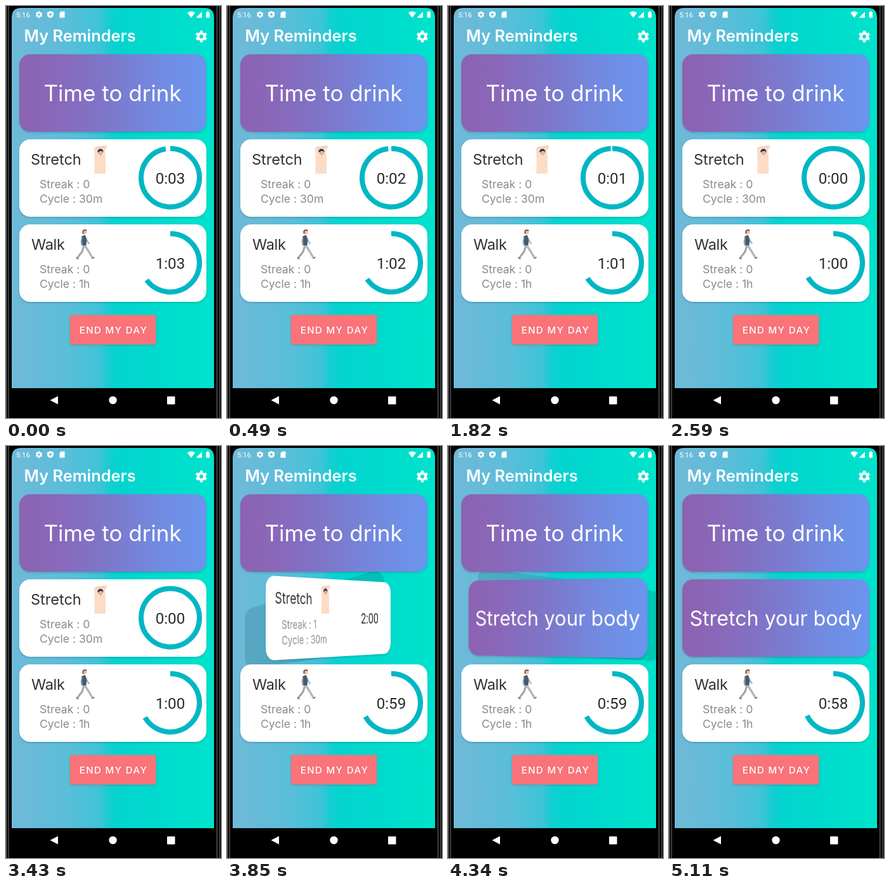
An HTML page for the animation above (5.18 s loop, 339 by 649 pixels).

```html
<!DOCTYPE html>
<html lang="en">
<head>
<meta charset="utf-8">
<title>Reminders</title>
<style>
  html, body { margin: 0; width: 100%; height: 100%; overflow: hidden; background: #000; }
  #stage { position: relative; width: 339px; height: 649px; overflow: hidden; background: #000; }
  svg { position: absolute; left: 0; top: 0; overflow: visible; }
  text { font-family: Inter, "Open Sans", sans-serif; }
  .card { position: absolute; left: 21px; width: 295px; height: 121.5px; border-radius: 17px; background: #fff; box-shadow: 0 1.5px 3px rgba(0,40,60,.22); }
  .alert { background: linear-gradient(90deg, #8d62b3, #8968b9 20%, #7d77ca 47%, #728ae0 74%, #6b95ee); }
  .alert text { fill: #fff; text-anchor: middle; }
  .name { font-size: 23.5px; fill: #303036; }
  .info { font-size: 17.6px; fill: #8a8a8a; }
  .time { font-family: Roboto, Arial, sans-serif; font-size: 24.2px; fill: #2c2c30; text-anchor: middle; }
  .ring { fill: none; stroke: #00b7c3; stroke-width: 8; }
  #button { position: absolute; left: 101px; top: 487px; width: 135px; height: 46px; border-radius: 3px; background: #f97379; box-shadow: 0 0 0 1px rgba(150,160,160,.6), 0 1px 3px rgba(0,40,60,.3); }
</style>
</head>
<body>
<div id="stage">
  <svg width="339" height="649">
    <defs>
      <linearGradient id="sky">
        <stop offset="0" stop-color="#70b9d8"/>
        <stop offset=".28" stop-color="#5abed9"/>
        <stop offset=".44" stop-color="#3cc4d7"/>
        <stop offset=".48" stop-color="#16cdd2"/>
        <stop offset=".53" stop-color="#04d4cf"/>
        <stop offset=".72" stop-color="#00dacd"/>
        <stop offset="1" stop-color="#00e3cb"/>
      </linearGradient>
      <g id="gear" fill="none" stroke="#fff">
        <circle r="5.1" stroke-width="4"/>
        <circle r="7.6" stroke-width="3.2" pathLength="12" stroke-dasharray="1 1" stroke-dashoffset="-.5"/>
      </g>
    </defs>
    <path d="M.7 0V649M4 0V649M332.7 0V649M337 0V649" stroke="#66666a" stroke-width="1.2"/>
    <path d="M9 602V18Q9 3 24 3H313Q328 3 328 18V602Z" fill="url(#sky)"/>

    <g fill="#fff">
      <text x="16" y="17.5" style="font: 11.3px Roboto, Arial, sans-serif">5:16</text>
      <use href="#gear" transform="translate(52 13.5) scale(.58)"/>
      <path d="M70 8L75 10V13.5Q75 17 70 19Q65 17 65 13.5V10Z"/>
      <circle cx="70" cy="13.3" r="1.8" fill="#4bbfd6"/>
      <path d="M87 8.5H92.5V18.5H84.5V11Z"/>
      <path d="M286 10.5Q292 6.5 298 10.5L292 18.5Z"/>
      <path d="M309 9V18.5H299.5Z"/>
      <path d="M315.5 9.5H317V8.3H319.5V9.5H321V18.5H315.5Z"/>
      <text x="28.5" y="56" font-size="25.4" font-weight="600">My Reminders</text>
      <use href="#gear" transform="translate(308 48)"/>
      <path d="M82 614.5V627.5L69.5 621Z"/>
      <circle cx="168.5" cy="621" r="6.2"/>
      <rect x="254" y="615" width="12.5" height="12.5" rx="1"/>
    </g>
    <polygon id="shade" fill="#064a55" stroke="#064a55" stroke-width="30" stroke-linejoin="round"/>
  </svg>

  <div class="card alert" style="top:76px">
    <svg width="295" height="121"><text x="147" y="74" font-size="35">Time to drink</text></svg>
  </div>

  <div class="card" id="front" style="top:210px">
    <svg width="295" height="121">
      <text class="name" x="18" y="40">Stretch</text>
      <text class="info" x="32" y="77" id="streak"></text>
      <text class="info" x="32" y="100">Cycle : 30m</text>
      <g>
        <path d="M118.5 54V27L117.5 14L121 11.5L137 9L139 11.5L135 18L136 28V54Z" fill="#fddcc6"/>
        <path d="M120 14L135 12" stroke="#edc0a7" fill="none"/>
        <circle cx="128" cy="21" r="4" fill="#f6cbb4"/>
        <path d="M123 20.5Q123.5 15 128 15Q132.500 15 132.500 20.500Q130 17.500 127 19Z" fill="#34344c"/>
        <path d="M125.500 21.500H127M129.500 21.500H131" stroke="#34344c"/>
        <path d="M127 24H129.500" stroke="#cf6b6b"/>
      </g>
      <circle class="ring" id="stretchRing" cx="238" cy="60.5" r="46" pathLength="360" transform="rotate(-90 238 60.5)"/>
      <text class="time" id="stretchTime" x="238" y="70"></text>
    </svg>
  </div>
  <div class="card alert" id="back" style="top:210px">
    <svg width="295" height="121"><text x="147.500" y="73" font-size="32.2">Stretch your body</text></svg>
  </div>

  <div class="card" style="top:344px">
    <svg width="295" height="121">
      <text class="name" x="19" y="40" letter-spacing="-.3">Walk</text>
      <text class="info" x="32" y="77">Streak : 0</text>
      <text class="info" x="32" y="100">Cycle : 1h</text>
      <g fill="none" stroke-linecap="round" stroke-linejoin="round">
        <path d="M102 33L99 43L92 52" stroke="#a3a3a9" stroke-width="3"/>
        <path d="M103 33L109 42L115 52" stroke="#b4b4b9" stroke-width="3.4"/>
        <path d="M90 53L93 54M115 53.500L118 52" stroke="#6a6a72" stroke-width="1.6"/>
        <path d="M98 19L103.500 16.500L106.500 23L105.500 33H99.500Z" fill="#465a70"/>
        <path d="M99 21L97.500 28L99 33" stroke="#8494a5" stroke-width="1.8"/>
        <path d="M105.500 22L107.500 27L110 30" stroke="#8494a5" stroke-width="1.600"/>
        <circle cx="103.500" cy="12.500" r="3" fill="#f3c3a6"/>
        <path d="M100.500 14V10.500Q102 8 105.500 9.500" stroke="#75503f" stroke-width="2"/>
      </g>
      <circle class="ring" id="walkRing" cx="238" cy="60.5" r="46" pathLength="360" transform="rotate(-90 238 60.5)"/>
      <text class="time" id="walkTime" x="238" y="70"></text>
    </svg>
  </div>

  <div id="button">
    <svg width="135" height="46"><text x="68.500" y="28.500" font-size="15" font-weight="500" fill="#fff" text-anchor="middle" letter-spacing="1.4">END MY DAY</text></svg>
  </div>
</div>

<script>
const LOOP = 5180, STEP = 70, FIRST_TICK = 470, FLIP_START = 3473, FLIP_TIME = 1084, DEPTH = 1200;
const CENTER = { x: 168.5, y: 270.5 }, HALF = { w: 147.5, h: 60.75 }, ROUND = 15;
const el = id => document.getElementById(id);
const clock = s => Math.floor(s / 60) + ':' + String(s % 60).padStart(2, '0');

function setTimer(name, left, total) {
  const sweep = 360 * (1 - left / total);
  const ring = el(name + 'Ring');
  el(name + 'Time').textContent = clock(left);
  ring.style.visibility = sweep > 0 ? 'visible' : 'hidden';
  ring.setAttribute('stroke-dasharray', sweep >= 360 ? 'none' : sweep + ' 360');
}

// The edge nearer to the viewer throws its shadow further out and down.
function drawShade(angle) {
  const sin = Math.sin(angle), cos = Math.cos(angle), ramp = Math.min(1, 4 * sin);
  const edge = (side, dx, dy) => {
    const scale = DEPTH / (DEPTH + side * HALF.w * sin);
    const x = CENTER.x + side * HALF.w * cos * scale + dx - ROUND * Math.sign(cos) * side;
    const reach = HALF.h * scale - ROUND;
    return [[x, CENTER.y - reach + dy].join(), [x, CENTER.y + reach + dy / 4].join()];
  };
  const near = edge(-1, -66 * sin * cos, 68 * sin);
  const far = edge(1, -15 * cos * ramp, -18 * ramp);
  el('shade').setAttribute('points', [near[0], far[0], far[1], near[1]].join(' '));
  el('shade').style.opacity = .17 * ramp;
}

function flip(progress) {
  const eased = (1 - Math.cos(Math.PI * progress)) / 2;
  const degrees = 180 * eased;
  const turn = a => a ? `perspective(${DEPTH}px) rotateY(${a}deg)` : 'none';
  el('front').style.transform = turn(degrees);
  el('back').style.transform = turn(degrees - 180);
  el('front').style.visibility = degrees < 90 ? 'visible' : 'hidden';
  el('back').style.visibility = degrees < 90 ? 'hidden' : 'visible';
  if (degrees >= 90) el('stretchRing').style.visibility = 'hidden';
  drawShade(degrees * Math.PI / 180);
}

function render(now) {
  const t = Math.floor((now % LOOP) / STEP) * STEP;
  const ticks = Math.floor((t - FIRST_TICK) / 1000) + 1;
  const done = ticks > 3;
  setTimer('stretch', done ? 120 : 3 - ticks, 120);
  setTimer('walk', 63 - ticks, 180);
  el('streak').textContent = 'Streak : ' + (done ? 1 : 0);
  flip(Math.min(1, Math.max(0, (t - FLIP_START) / FLIP_TIME)));
}

const start = performance.now();
function loop() {
  render(performance.now() - start);
  requestAnimationFrame(loop);
}
loop();
</script>
</body>
</html>
```
